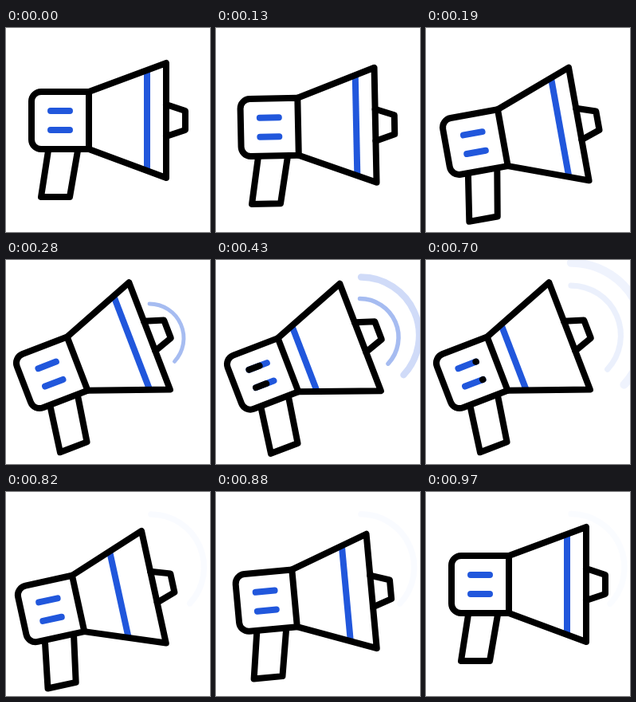
These frames come from a looping animation (256x256 px, 1.2 s). An HTML page:

```html
<!DOCTYPE html>
<html lang="en">
<head>
<meta charset="utf-8">
<title>Megaphone</title>
<style>
  html, body { margin: 0; width: 100%; height: 100%; overflow: hidden; background: #fff; }
  svg { display: block; width: 100%; height: 100%; }
  path { fill: none; stroke-width: 8; stroke-linecap: round; stroke-linejoin: round; }
  .ink { stroke: #000; }
  .blue { stroke: #2157dc; }
</style>
</head>
<body>
<svg viewBox="0 0 256 256">
  <path id="outer" class="blue"/>
  <path id="inner" class="blue"/>
  <g id="horn">
    <path class="ink" d="M53 154L44 212H80L90 154"/>
    <path class="ink" d="M201 96L225 104V128L201 136"/>
    <path id="stripe" class="blue" style="stroke-linecap: butt"/>
    <path class="ink" d="M104 80H44a12 12 0 0 0-12 12v48a12 12 0 0 0 12 12H104Z"/>
    <path class="ink" d="M104 80L201 44V188L104 152"/>
    <path class="blue" d="M56 104H80M56 128H80"/>
    <path id="dashes" class="ink"/>
  </g>
</svg>
<script>
  const LOOP = 1200, FIRST = 130, STEP = 30, LAST = 970;
  const PIVOT = [135, 162], TILT = 21;

  // Rows of [time, radius, opacity]
  const INNER = [[220, 41, 0], [280, 43, .4], [430, 48.5, .4], [700, 62.5, .09], [820, 66.5, .025], [970, 67, .02]];
  const OUTER = [[310, 68, 0], [370, 70, .2], [430, 73, .21], [700, 91, .07], [790, 95, 0]];

  const el = id => document.getElementById(id);
  const clamp = x => Math.min(1, Math.max(0, x));
  const part = (t, a, b) => clamp((t - a) / (b - a));
  const ease = s => (1 - Math.cos(Math.PI * s)) / 2;
  const arch = s => Math.sin(Math.PI * s);

  function lookup(rows, t) {
    if (t <= rows[0][0]) return rows[0].slice(1);
    for (let i = 1; i < rows.length; i++) {
      const [a, b] = [rows[i - 1], rows[i]];
      if (t <= b[0]) {
        const s = part(t, a[0], b[0]);
        return [1, 2].map(k => a[k] + (b[k] - a[k]) * s);
      }
    }
    return rows[rows.length - 1].slice(1);
  }

  function drawWave(node, rows, t) {
    const [r, alpha] = lookup(rows, t);
    const k = clamp((r - 43) / 20);
    const cx = 180 + 2 * k, cy = 98 - 3.5 * k;
    const end = 43 * Math.PI / 180;
    node.setAttribute("d", `M${cx} ${cy - r}A${r} ${r} 0 0 1 ${cx + r * Math.cos(end)} ${cy + r * Math.sin(end)}`);
    node.style.strokeWidth = r * .114;
    node.style.opacity = alpha;
  }

  function drawHorn(t) {
    const up = part(t, 103, 280), down = part(t, 700, 970);
    const angle = TILT * (ease(up) - ease(down));
    let x = -14 * arch(down) * (1 - down) ** 2;
    let y = 15.5 * arch(up) + 16.5 * arch(down);
    if (t > 280 && t < 700) {
      const shake = Math.sin((t - 280) / 210 * 2 * Math.PI);
      x -= shake;
      y -= 1.6 * shake;
    }
    el("horn").setAttribute("transform", `translate(${x} ${y}) rotate(${-angle} ${PIVOT})`);
  }

  function drawStripe(t) {
    const x = 177 - 68 * (ease(part(t, 280, 505)) - ease(part(t, 565, 970)));
    const half = 36 + (x - 104) * 36 / 97;
    el("stripe").setAttribute("d", `M${x} ${116 - half}V${116 + half}`);
  }

  // A black run passes over both blue dashes, left to right
  function drawDashes(t) {
    const head = ease(part(t, 280, 550)), tail = ease(part(t, 550, 715));
    const a = 56 + 24 * tail, b = 56 + 24 * head;
    const shown = head > 0 && tail < 1;
    el("dashes").setAttribute("d", shown ? `M${a} 104H${b + .01}M${a} 128H${b + .01}` : "");
  }

  function draw(ms) {
    let t = ms % LOOP;
    t = t < FIRST ? 0 : Math.min(LAST, FIRST + STEP * Math.floor((t - FIRST) / STEP));
    drawWave(el("inner"), INNER, t);
    drawWave(el("outer"), OUTER, t);
    drawHorn(t);
    drawStripe(t);
    drawDashes(t);
  }

  const start = performance.now();
  function tick() {
    draw(performance.now() - start);
    requestAnimationFrame(tick);
  }
  tick();
</script>
</body>
</html>
```
